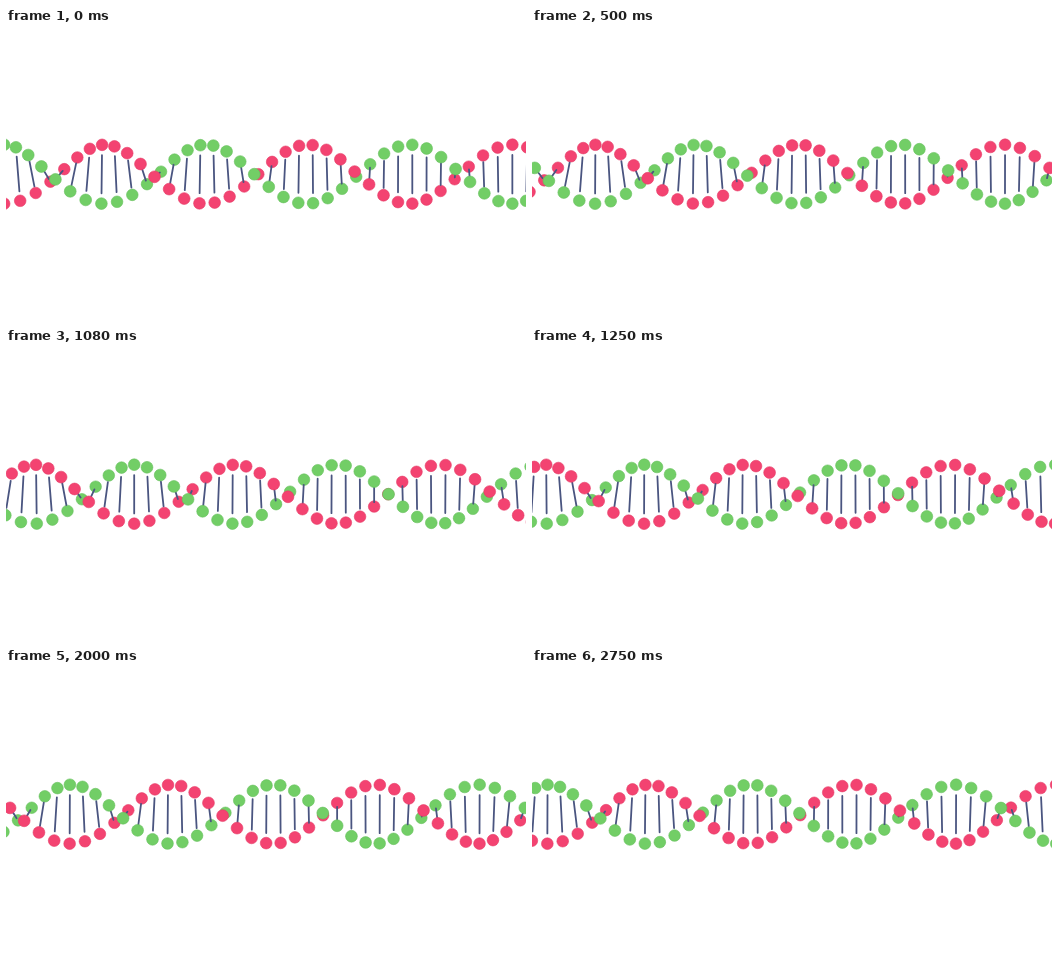
Animation, 520 px wide and 292 px high, one loop 2910 ms. Source, as an HTML page:

```html
<!DOCTYPE html>
<html lang="en">
<head>
<meta charset="utf-8">
<title>DNA helix</title>
<style>
html, body { margin: 0; width: 100%; height: 100%; overflow: hidden; background: #fff; }
svg { display: block; width: 520px; height: 292px; }
.red { fill: #f34371; stroke: #e63a66; }
.green { fill: #72ce66; stroke: #66c05c; }
circle { stroke-width: .6; }
line { stroke: #4a5580; stroke-width: 1.8; stroke-linecap: round; }
</style>
</head>
<body>
<svg viewBox="0 0 520 292">
  <g id="back"></g>
  <g id="rods"></g>
  <g id="front"></g>
</svg>
<script>
const LOOP = 2910;
const TURN = 36;                 // poses in one full turn
const STEP = 25 * Math.PI / 180; // twist from one pair to the next
const DRIFT = .0537;             // pairs moved left per pose
const FIRST = -24, LAST = 20;
const EYE = 412, PAN = 3.4;      // vanishing point and its move per pose
const MID = 146.2, RADIUS = 29.5, DEPTH = .0126;
const GAP = .175;                // part of a rod left open at each end

// [start in ms, pose]: every pose is held until the next one
const holds = [
  [0, 0], [80, .7], [330, 3.76], [500, 6.1],
  [750, 8.9], [830, 9.58], [1080, 12.7], [1250, 15.4],
  [1500, 18], [1580, 18.7], [1830, 21.8], [2000, 24],
  [2250, 27], [2330, 27.8], [2580, 30.6], [2750, 32.7]
];

const back = document.getElementById('back');
const rods = document.getElementById('rods');
const front = document.getElementById('front');

function make(name, parent, cls) {
  const el = document.createElementNS('http://www.w3.org/2000/svg', name);
  if (cls) el.setAttribute('class', cls);
  parent.appendChild(el);
  return el;
}

function set(el, attrs) {
  for (const key in attrs) el.setAttribute(key, attrs[key].toFixed(2));
}

const pairs = [];
for (let i = FIRST; i <= LAST; i++) {
  pairs.push({
    i,
    rod: make('line', rods),
    red: make('circle', back, 'red'),
    green: make('circle', back, 'green')
  });
}

// Point on a strand, seen in slight perspective
function project(s, angle, eye) {
  const axis = 301.2 + 14.16 * s + .006 * s * s;
  const z = Math.sin(angle);
  const scale = 1 + DEPTH * z;
  return {
    x: eye + (axis - eye) * scale,
    y: MID - RADIUS * Math.cos(angle) * scale,
    r: 5.85 * scale,
    z
  };
}

function placeDot(el, p) {
  set(el, { cx: p.x, cy: p.y, r: p.r });
  const layer = p.z > 0 ? front : back;
  if (el.parentNode !== layer) layer.appendChild(el);
}

function draw(pose) {
  const eye = EYE - PAN * pose;
  for (const { i, rod, red, green } of pairs) {
    const s = i + .4 - DRIFT * pose;
    const angle = s * STEP + 2 * Math.PI * pose / TURN;
    const a = project(s, angle, eye);
    const b = project(s, angle + Math.PI, eye);
    const dx = (b.x - a.x) * GAP, dy = (b.y - a.y) * GAP;
    placeDot(red, a);
    placeDot(green, b);
    set(rod, { x1: a.x + dx, y1: a.y + dy, x2: b.x - dx, y2: b.y - dy });
  }
}

function poseAt(ms) {
  let pose = 0;
  for (const [start, value] of holds) if (ms >= start) pose = value;
  return pose;
}

const begin = performance.now();
let shown = 0;
draw(shown);

function tick() {
  const pose = poseAt((performance.now() - begin) % LOOP);
  if (pose !== shown) draw(shown = pose);
  requestAnimationFrame(tick);
}
requestAnimationFrame(tick);
</script>
</body>
</html>
```
